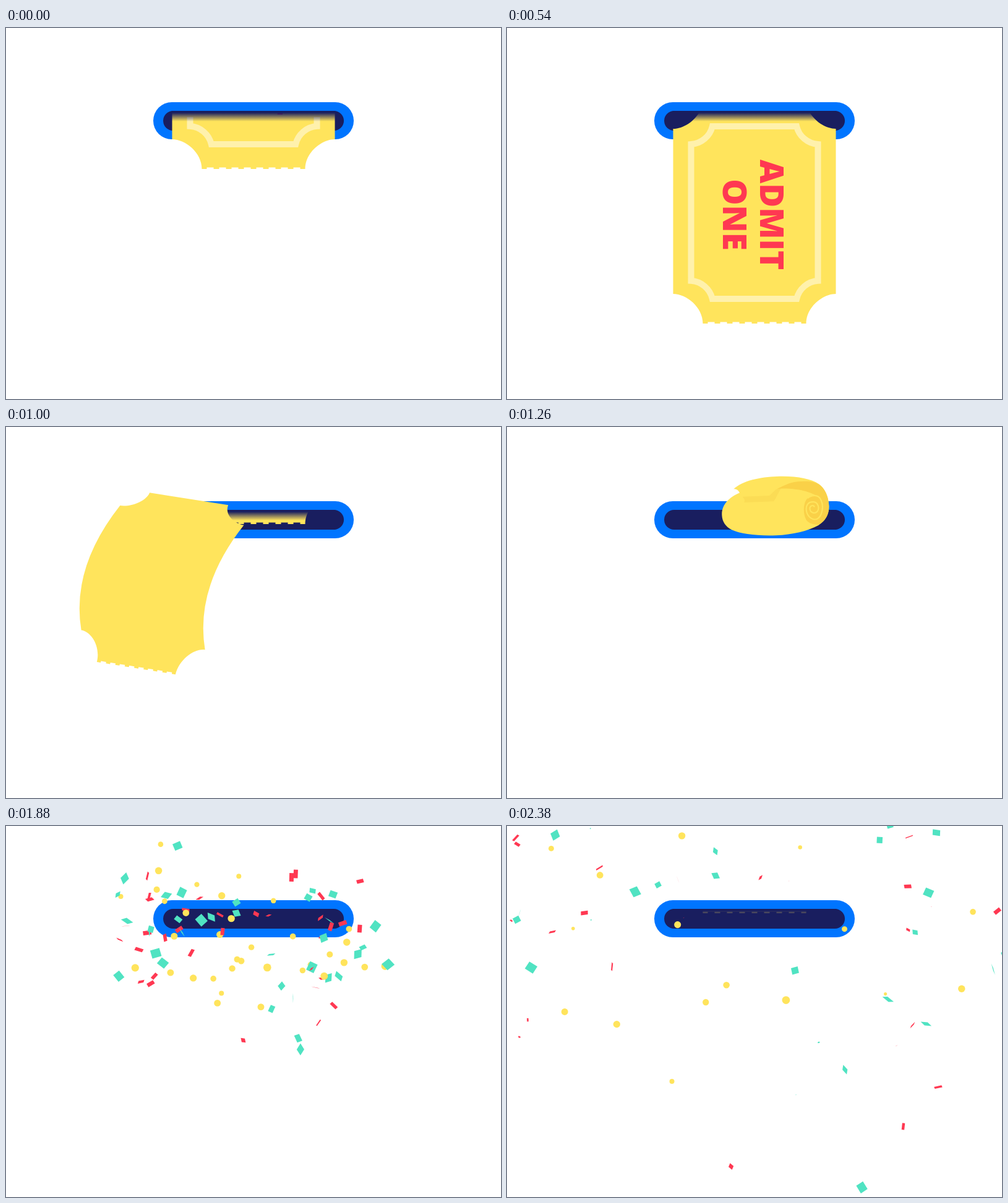
Recreate the animation shown at these times as an HTML page. Size 800 px wide and 600 px high, loop 2400 ms.

```html
<!DOCTYPE html>
<html lang="en">
<head>
<meta charset="utf-8">
<title>Ticket to confetti</title>
<style>
  html, body { margin: 0; width: 100%; height: 100%; overflow: hidden; background: #fff; }
  svg { display: block; width: 100vw; height: 100vh; }
  text { font: 800 53px "Open Sans", "Noto Sans", sans-serif; text-anchor: middle; fill: #ff3852; }
</style>
</head>
<body>
<svg viewBox="0 0 800 600">
  <defs>
    <linearGradient id="shade" gradientUnits="userSpaceOnUse" x1="0" y1="137" x2="0" y2="151">
      <stop offset="0" stop-color="#191e5f"/>
      <stop offset="1" stop-color="#191e5f" stop-opacity="0"/>
    </linearGradient>
    <linearGradient id="strip" gradientUnits="userSpaceOnUse" x1="0" y1="137" x2="0" y2="151">
      <stop offset="0" stop-color="#191e5f"/>
      <stop offset="1" stop-color="#ffe45c"/>
    </linearGradient>
    <clipPath id="mouth"><rect y="134" width="800" height="466"/></clipPath>
    <clipPath id="lit"><rect y="144" width="800" height="456"/></clipPath>
  </defs>
  <rect x="238" y="120" width="324" height="60" rx="30" fill="#0075ff"/>
  <rect x="254" y="134" width="292" height="32" rx="16" fill="#191e5f"/>
  <g clip-path="url(#mouth)"><path id="next" fill="url(#strip)"/></g>
  <path id="paper" fill="#ffe45c"/>
  <g id="face">
    <g clip-path="url(#lit)">
      <path class="art" fill="none" stroke="#fff1ac" stroke-width="10"
        d="M63.4 44H199.6A38 38 0 0 0 234 73V293.8A38 38 0 0 0 199.6 323H63.4A38 38 0 0 0 29 293.8V73A38 38 0 0 0 63.4 44Z"/>
    </g>
    <g clip-path="url(#mouth)">
      <g class="art">
        <text transform="translate(140.5 187) rotate(90)">ADMIT</text>
        <text transform="translate(80.5 187) rotate(90)">ONE</text>
      </g>
    </g>
  </g>
  <rect id="dark" x="268" y="134" width="264" height="18" fill="url(#shade)"/>
  <g id="roll">
    <path fill="#ffe45c" d="M338 121C352 108 380 104 404 104C432 104 455 109 467 118C477 126 481 140 481 152C481 166 473 175 464 181C448 189 424 194 400 194C372 194 346 190 333 183C324 178 319 170 319 160C319 144 331 133 347 127C345 122 341 120 338 121Z"/>
    <path fill="#fbdc55" d="M351 133H392C398 128 401 122 411 121C406 127 403 135 398 142H353C355 139 354 136 351 133Z"/>
    <path fill="#fad148" d="M404 123C416 117 428 112 442 113C454 113 463 115 469 120C478 128 481 141 481 152C481 166 474 175 465 180C456 180 449 177 446 172C441 163 442 146 449 139C453 135 460 135 465 138C454 128 428 122 404 123Z"/>
    <path fill="none" stroke="#ffe45c" stroke-width="2" d="M449 139C456 134 464 134 468 140C474 150 471 166 463 171C456 174 449 168 447 160C445 150 450 144 458 145C465 146 467 155 463 160C459 164 452 161 452 155C452 150 458 149 459 153"/>
  </g>
  <g id="confetti"></g>
</svg>
<script>
const LOOP = 2400, W = 263, L = 363, R = 48, K = R * 0.4477;
const ROWS = [0, R, L / 2, L - R, L];
const TEAR = 600, FREE = 860, FOLD = 1000, CURL = 1140, SINK = 1620, GONE = 1700, BURST = 1760;
const $ = id => document.getElementById(id);
const arts = document.querySelectorAll('.art');
const clamp = x => Math.max(0, Math.min(1, x));
const span = (t, a, b) => clamp((t - a) / (b - a));
const smooth = x => x * x * (3 - 2 * x);
const mix = (a, b, p) => a.map((v, i) => v + (b[i] - v) * p);
const rad = deg => deg * Math.PI / 180;
const show = (id, on) => { $(id).style.display = on ? '' : 'none'; };

// Pose: centre x and y, tilt across, lean along, width, length, bow
const folded = [253, 253.2, 9, 17.3, 0.77, 0.79, 24];
const curled = [307, 148, 4, 3, 0.7, 0.235, 8];

// Hangs from the left end of the perforation.
function hanging(deg, drop) {
  const c = Math.cos(rad(deg)), s = Math.sin(rad(deg)), u = W / 2 - R, v = L / 2;
  return [316.5 + u * c - v * s, 157 + u * s + v * c + drop, deg, deg, 1, 1, 0];
}

function poseAt(t) {
  const rip = span(t, TEAR, FREE);
  const hang = hanging(20 * rip ** 3.5, 22 * rip ** 8);
  if (t < FREE) return hang;
  if (t > FOLD) return mix(folded, curled, span(t, FOLD, CURL));
  const turn = span(t, FREE, FOLD);
  const pose = mix(hang, folded, turn);
  pose[4] *= 1 - 0.6 * Math.sin(Math.PI * turn);
  return pose;
}

// Maps ticket coordinates to the stage.
function mapper([x, y, tilt, lean, width, length, bow]) {
  const ux = Math.cos(rad(tilt)) * width, uy = Math.sin(rad(tilt)) * width;
  const vx = -Math.sin(rad(lean)) * length, vy = Math.cos(rad(lean)) * length;
  return (u, v) => {
    const a = u - W / 2, b = v - L / 2;
    const ends = clamp((L / 2 - Math.abs(b)) / R);
    const mid = clamp(1 - Math.abs(b) / (L / 2 - R));
    return [x + ux * a + vx * b - bow * mid, y + uy * a + vy * b - 0.4 * bow * ends];
  };
}

function outline(at, topTeeth) {
  const p = (u, v) => at(u, v).map(n => n.toFixed(2)).join(' ') + ' ';
  const notch = (...pts) => 'C' + pts.map(q => p(...q)).join('');
  const side = (u, v) => {
    const a = at(u, R), b = at(u, L - R), m = at(u, L / 2);
    return 'Q' + m.map((n, i) => 2 * n - (a[i] + b[i]) / 2).join(' ') + ' ' + p(u, v);
  };
  const teeth = (edge, inner, back) => {
    let d = '';
    for (let i = 0; i < 8; i++) {
      let a = 56 + 20 * (back ? 7 - i : i), b = a + 11;
      if (back) [a, b] = [b, a];
      d += 'L' + p(a, edge) + 'L' + p(a, inner) + 'L' + p(b, inner) + 'L' + p(b, edge);
    }
    return d;
  };
  return 'M' + p(R, 0) + (topTeeth ? teeth(0, 2.5, false) : '') + 'L' + p(W - R, 0) +
    notch([W - R, R - K], [W - K, R], [W, R]) + side(W, L - R) +
    notch([W - K, L - R], [W - R, L - R + K], [W - R, L]) +
    teeth(L, L - 2.5, true) + 'L' + p(R, L) +
    notch([R, L - R + K], [K, L - R], [0, L - R]) + side(0, R) +
    notch([K, R], [R, R - K], [R, 0]) + 'Z';
}

function drawTicket(t) {
  const peek = t >= 2340, feeding = t < TEAR || peek;
  const front = feeding || t < (FREE + FOLD) / 2;
  const end = peek ? 134 + 7 * span(t, 2340, 2380) : Math.min(520, 228 + 0.253 * t + 0.000389 * t * t);
  const at = mapper(feeding ? hanging(0, end - 520) : poseAt(t));
  const shaded = t < 760 || peek;

  show('paper', t < CURL || peek);
  show('dark', shaded);
  show('face', front);
  $('paper').setAttribute('d', outline(at, front));
  $('paper').setAttribute('clip-path', shaded ? 'url(#mouth)' : 'none');
  if (front) {
    const o = at(0, 0), u = at(W, 0), v = at(0, L);
    const m = [(u[0] - o[0]) / W, (u[1] - o[1]) / W, (v[0] - o[0]) / L, (v[1] - o[1]) / L, ...o];
    arts.forEach(el => el.setAttribute('transform', `matrix(${m})`));
  }

  const stub = end - L - 30 * smooth(span(t, 1020, 1180));
  show('next', t < 1180);
  $('next').setAttribute('d', outline(mapper(hanging(0, stub - 520)), false));
}

// The roll swings and hops with damping, then sinks into the slot.
function drawRoll(t) {
  show('roll', t >= CURL && t < GONE);
  const age = t - CURL;
  const swing = Math.cos(Math.PI * age / 184) * Math.exp(-0.0022 * age);
  const hop = Math.sin(Math.PI * age / 153) * Math.exp(-0.004 * age);
  const p = span(t, SINK, GONE);
  const size = 1 - p * p * (2.7 * p - 1.7);
  const sx = size * (1 + 0.2 * Math.abs(swing)), sy = size * (1 + 0.15 * hop);
  $('roll').setAttribute('transform',
    `translate(${400 - 95 * swing} ${149 - 55 * hop}) rotate(${6 * swing}) scale(${sx} ${sy}) translate(-400 -149)`);
}

let seed = 11;
const rand = (a = 0, b = 1) => {
  seed = (seed * 16807) % 2147483647;
  return a + (b - a) * seed / 2147483647;
};

const COLORS = ['#ffe45c', '#50e3c2', '#ff3852'];

function makePiece(i) {
  const kind = i % 3;
  const el = document.createElementNS('http://www.w3.org/2000/svg', kind ? 'rect' : 'circle');
  const set = (k, v) => el.setAttribute(k, v);
  set('fill', COLORS[kind]);
  if (kind) {
    const w = kind === 1 ? rand(10, 16) : rand(11, 14), h = w * (kind === 1 ? 0.88 : 0.52);
    set('x', -w / 2); set('y', -h / 2); set('width', w); set('height', h);
  } else set('r', rand(4, 6.5));
  $('confetti').append(el);
  return {
    el, kind,
    dx: rand(-400, 400), dy: rand(-170, 170) + rand(-150, 150), end: rand(2200, 2850),
    spin: rand(0, 360), rate: rand(-0.35, 0.35), skew: rand(0, 90),
    tilt: rand(0, 6.3), flip: rand(0.003, 0.009)
  };
}
const pieces = Array.from({ length: 105 }, (_, i) => makePiece(i));

function drawConfetti(t) {
  const age = t - BURST;
  show('confetti', age > 0);
  if (age <= 0) return;
  const grow = 1.37 * (1 - Math.exp(-0.00437 * age));
  const cy = 200 - 50 * Math.exp(-age / 60);
  for (const q of pieces) {
    const s = clamp(age / 80) * span(t, q.end, q.end - 200);
    const turn = q.kind
      ? ` rotate(${q.spin + q.rate * age}) scale(${Math.cos(q.tilt + q.flip * age)} 1) rotate(${q.skew})`
      : '';
    q.el.setAttribute('transform', `translate(${400 + q.dx * grow} ${cy + q.dy * grow}) scale(${s})${turn}`);
  }
}

function draw(t) {
  drawTicket(t);
  drawRoll(t);
  drawConfetti(t);
}

let start;
function tick(now) {
  start ??= now;
  draw((now - start) % LOOP);
  requestAnimationFrame(tick);
}
draw(0);
requestAnimationFrame(tick);
</script>
</body>
</html>
```
